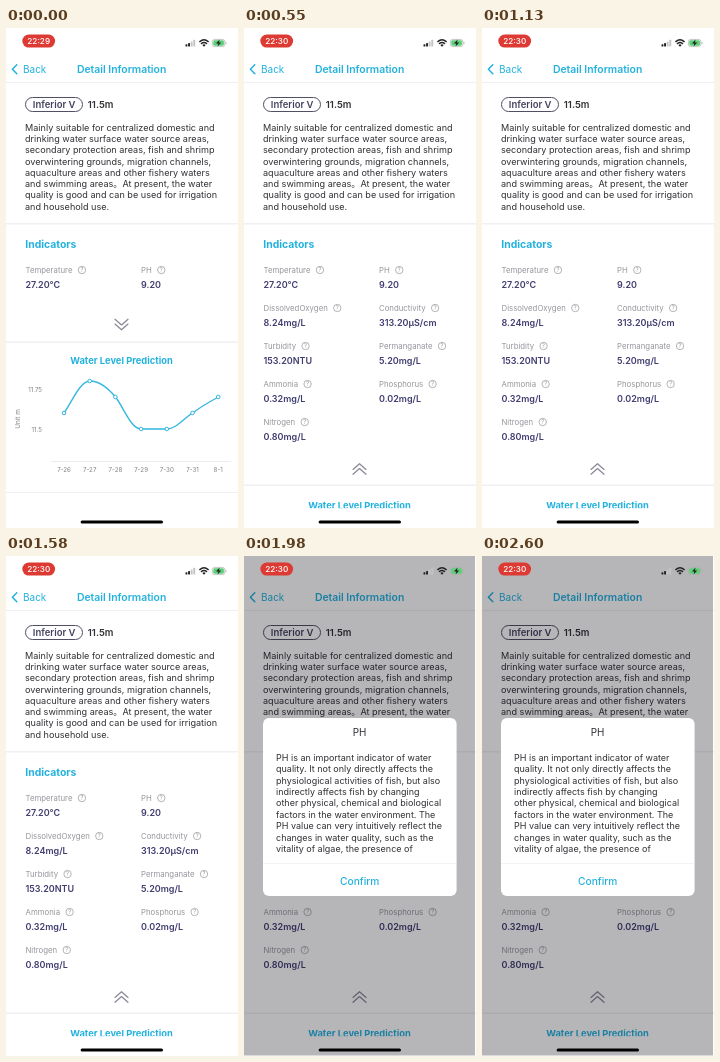
An HTML page for the animation above (2.65 s loop, 232 by 500 pixels).

```html
<!DOCTYPE html>
<html lang="en">
<head>
<meta charset="utf-8">
<title>Detail Information</title>
<style>
  html, body { margin: 0; width: 100%; height: 100%; overflow: hidden; background: #fff; }
  svg { display: block; width: 232px; height: 500px; }
  text { font-family: Inter, "Noto Sans CJK SC", "Noto Sans CJK", sans-serif; white-space: pre; }
</style>
</head>
<body>
<svg id="stage" viewBox="0 0 232 500"></svg>
<script>
const LOOP = 2650;
const STEPS = [[0, 'closed'], [100, 'open'], [1980, 'dialog']];
const BLUE = '#23b2de', INK = '#303036', INDIGO = '#403d70', GREY = '#96969d', RULE = '#f0f0f2';

const stage = document.getElementById('stage');

function add(parent, tag, attrs = {}) {
  const el = document.createElementNS('http://www.w3.org/2000/svg', tag);
  for (const key in attrs) el.setAttribute(key, attrs[key]);
  return parent.appendChild(el);
}

// y is the middle of the capitals
function text(parent, str, x, y, size, fill, weight = 400, anchor = 'start') {
  const el = add(parent, 'text', {
    x, y: y + size * .364, fill, 'font-size': size, 'font-weight': weight, 'text-anchor': anchor
  });
  el.textContent = str;
  return el;
}

function rect(parent, x, y, width, height, fill, rx = 0) {
  return add(parent, 'rect', { x, y, width, height, fill, rx });
}

function line(parent, d, stroke, width) {
  return add(parent, 'path', {
    d, stroke, 'stroke-width': width, fill: 'none', 'stroke-linecap': 'round', 'stroke-linejoin': 'round'
  });
}

function paragraph(parent, lines, x, y, size, pitch) {
  lines.forEach((str, i) => text(parent, str, x, y + i * pitch, size, INK));
}

function indicator(parent, name, value, x, y) {
  const label = text(parent, name, x, y, 7.8, GREY);
  const cx = x + label.getComputedTextLength() + 9.5;
  add(parent, 'circle', { cx, cy: y, r: 3.7, fill: 'none', stroke: GREY, 'stroke-width': .7 });
  text(parent, '?', cx, y, 5.6, GREY, 400, 'middle');
  text(parent, value, x, y + 14.5, 9, INDIGO, 600);
}

function chevrons(parent, y, dir) {
  for (const shift of [-2.4, 2.4]) {
    const tip = y + shift + dir * 2.8, end = y + shift - dir * 2.8;
    line(parent, `M109 ${end}L115.5 ${tip}L122 ${end}`, '#8a8a9a', 1.3);
  }
}

function chartTitle(parent, y) {
  text(parent, 'Water Level Prediction', 115.5, y, 9.35, BLUE, 700, 'middle');
}

function chart(parent) {
  const axis = '#808086';
  chartTitle(parent, 333);
  text(parent, '11.75', 36, 361.3, 6.2, axis, 400, 'end');
  text(parent, '11.5', 36, 401.5, 6.2, axis, 400, 'end');
  text(parent, 'Unit m', 0, 0, 6.4, axis, 400, 'middle').setAttribute('transform', 'translate(12 391) rotate(-90)');
  rect(parent, 45, 433, 180, .7, '#e6e6ea');
  line(parent, 'M58 385C66 374 74 353 84 353C94 353 102 360 109.5 369C118 380 125 401 135 401H161' +
    'C170 401 177 391 186.5 385C194 379.5 203 374 212.5 369', '#35b7e1', 1.4);
  const days = ['7-26', '7-27', '7-28', '7-29', '7-30', '7-31', '8-1'];
  [385, 353, 369, 401, 401, 385, 369].forEach((cy, i) => {
    const cx = 58 + i * 25.7;
    add(parent, 'circle', { cx, cy, r: 1.8, fill: '#fff', stroke: '#35b7e1', 'stroke-width': 1 });
    text(parent, days[i], cx, 441.5, 6.2, axis, 400, 'middle');
  });
  rect(parent, 0, 464, 232, 1, RULE);
}

function page(parent) {
  rect(parent, 0, 0, 232, 500, '#fff');
  line(parent, 'M10.8 36.8L6.4 41.3L10.8 45.8', BLUE, 1.5);
  text(parent, 'Back', 17, 41.4, 10, BLUE);
  text(parent, 'Detail Information', 115.6, 41.3, 10.4, BLUE, 600, 'middle');
  rect(parent, 0, 54, 232, 1, RULE);

  add(parent, 'rect', { x: 19.5, y: 69.5, width: 57, height: 14, rx: 7, fill: 'none', stroke: '#505064' });
  text(parent, 'Inferior V', 48.2, 76.5, 9.5, '#45435f', 600, 'middle');
  text(parent, '11.5m', 81.8, 76.5, 9.6, INK, 600);
  paragraph(parent, [
    'Mainly suitable for centralized domestic and',
    'drinking water surface water source areas,',
    'secondary protection areas, fish and shrimp',
    'overwintering grounds, migration channels,',
    'aquaculture areas and other fishery waters',
    'and swimming areas。At present, the water',
    'quality is good and can be used for irrigation',
    'and household use.'
  ], 19, 99.6, 9.1, 11.25);
  rect(parent, 0, 195, 232, 1.5, RULE);
  text(parent, 'Indicators', 19.3, 216.5, 10.4, BLUE, 700);
  indicator(parent, 'Temperature', '27.20°C', 19.5, 242);
  indicator(parent, 'PH', '9.20', 135, 242);
}

function closedPart(parent) {
  chevrons(parent, 296.5, 1);
  rect(parent, 0, 313.5, 232, 1.5, RULE);
  chart(parent);
}

function openPart(parent) {
  [
    ['DissolvedOxygen', '8.24mg/L', 'Conductivity', '313.20μS/cm'],
    ['Turbidity', '153.20NTU', 'Permanganate', '5.20mg/L'],
    ['Ammonia', '0.32mg/L', 'Phosphorus', '0.02mg/L'],
    ['Nitrogen', '0.80mg/L']
  ].forEach(([a, av, b, bv], i) => {
    const y = 280 + i * 38;
    indicator(parent, a, av, 19.5, y);
    if (b) indicator(parent, b, bv, 135, y);
  });
  chevrons(parent, 441, -1);
  rect(parent, 0, 456.5, 232, 1.5, RULE);
  chartTitle(parent, 477.7);
  rect(parent, 0, 480.2, 232, 19.8, '#fff');
}

function dialogPart(parent) {
  rect(parent, 0, 0, 231, 499.5, '#05050f').setAttribute('opacity', .29);
  rect(parent, 19, 162, 193.6, 178, '#fff', 6);
  text(parent, 'PH', 115.6, 176.3, 9.9, INK, 400, 'middle');
  paragraph(parent, [
    'PH is an important indicator of water',
    'quality. It not only directly affects the',
    'physiological activities of fish, but also',
    'indirectly affects fish by changing',
    'other physical, chemical and biological',
    'factors in the water environment. The',
    'PH value can very intuitively reflect the',
    'changes in water quality, such as the',
    'vitality of algae, the presence of'
  ], 32, 201.5, 9, 11.4);
  rect(parent, 19, 307, 193.6, .8, RULE);
  text(parent, 'Confirm', 115.7, 324.9, 10.2, BLUE, 500, 'middle');
}

function statusBar(parent) {
  rect(parent, 16.3, 6.6, 32.8, 13, '#dd3a33', 6.5);
  const clock = text(parent, '22:29', 32.7, 13.1, 8.2, '#fff', 500, 'middle');
  [2.2, 3.4, 5, 6.6].forEach((h, i) =>
    rect(parent, 179.5 + i * 2.6, 18.4 - h, 1.9, h, i < 2 ? '#222' : '#c4c4c6', .5));
  line(parent, 'M193.8 13.6Q198 10 202.2 13.6M195.4 15.5Q198 13.3 200.6 15.5', '#222', 1.4);
  add(parent, 'path', { d: 'M196.3 17Q198 15.6 199.7 17L198 18.8Z', fill: '#222' });
  add(parent, 'rect', { x: 206.4, y: 11.4, width: 12.4, height: 7.2, rx: 2.2, fill: 'none', stroke: '#a8b4a9', 'stroke-width': .7 });
  rect(parent, 207.3, 12.3, 10.6, 5.4, '#5fce78', 1.4);
  rect(parent, 219.5, 13.7, .9, 2.6, '#a8b4a9', .4);
  add(parent, 'path', { d: 'M213.6 11.4L210 15.5H212.3L211.6 18.6L215.2 14.4H212.9Z', fill: '#222' });
  rect(parent, 74.6, 492.4, 82.4, 3, '#000', 1.5);
  return clock;
}

page(add(stage, 'g'));
const closed = add(stage, 'g'), open = add(stage, 'g'), dialog = add(stage, 'g');
closedPart(closed);
openPart(open);
dialogPart(dialog);
const clock = statusBar(add(stage, 'g'));

const show = (el, on) => el.style.visibility = on ? 'visible' : 'hidden';

function draw(now) {
  const t = now % LOOP;
  const state = STEPS.filter(([at]) => at <= t).pop()[1];
  show(closed, state === 'closed');
  show(open, state !== 'closed');
  show(dialog, state === 'dialog');
  clock.textContent = state === 'closed' ? '22:29' : '22:30';
}

let start;
function tick(now) {
  start ??= now;
  draw(now - start);
  requestAnimationFrame(tick);
}
draw(0);
requestAnimationFrame(tick);
</script>
</body>
</html>
```
